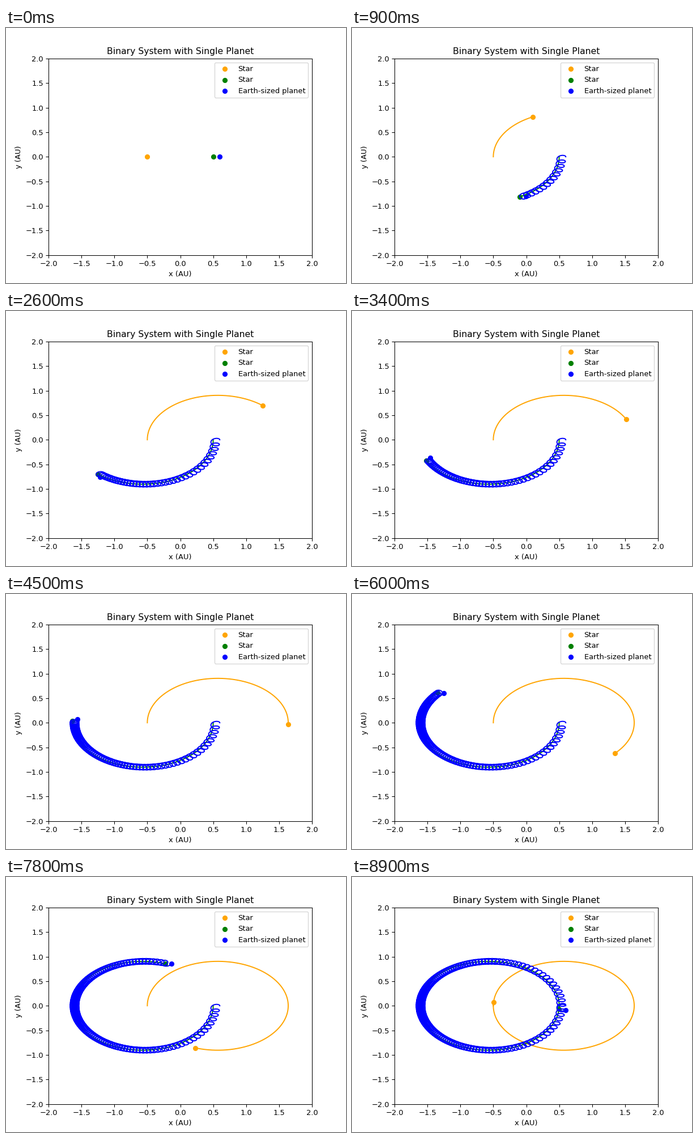
Animation of 600x450 px, one loop 9 s. Source, as a matplotlib script:

```python
import numpy as np
import matplotlib.pyplot as plt
from matplotlib.animation import FuncAnimation

FRAMES = 90
INTERVAL = 100            # ms
GM = 4 * np.pi ** 2       # one solar mass, in AU^3 / yr^2
SAMPLES = 50              # trail points per frame
SUBSTEPS = 20             # integration steps per trail point
DT = 0.025 / (SAMPLES * SUBSTEPS)   # years


def accel(star, planet):
    """Accelerations; the other star always sits at -star."""
    near, far = planet - star, planet + star
    return (-GM * star / (4 * abs(star) ** 3),
            -GM * (near / abs(near) ** 3 + far / abs(far) ** 3))


def rk4(s, p, vs, vp, h):
    k = h / 2
    as1, ap1 = accel(s, p)
    vs2, vp2 = vs + k * as1, vp + k * ap1
    as2, ap2 = accel(s + k * vs, p + k * vp)
    vs3, vp3 = vs + k * as2, vp + k * ap2
    as3, ap3 = accel(s + k * vs2, p + k * vp2)
    vs4, vp4 = vs + h * as3, vp + h * ap3
    as4, ap4 = accel(s + h * vs3, p + h * vp3)
    w = h / 6
    return (s + w * (vs + 2 * vs2 + 2 * vs3 + vs4),
            p + w * (vp + 2 * vp2 + 2 * vp3 + vp4),
            vs + w * (as1 + 2 * as2 + 2 * as3 + as4),
            vp + w * (ap1 + 2 * ap2 + 2 * ap3 + ap4))


def simulate():
    """Positions as complex numbers x + iy for both stars and the planet."""
    state = (0.5 + 0j, 0.6 + 0j, -5.5j, 8.6j)
    track = [state[:2]]
    for _ in range((FRAMES - 1) * SAMPLES):
        for _ in range(SUBSTEPS):
            state = rk4(*state, DT)
        track.append(state[:2])
    star, planet = np.array(track).T
    return -star, star, planet


paths = simulate()
colors = ["orange", "green", "blue"]
labels = ["Star", "Star", "Earth-sized planet"]

fig, ax = plt.subplots(figsize=(6.4, 4.8), dpi=93.75)   # 600 x 450 px
ax.set(xlim=(-2, 2), ylim=(-2, 2), xlabel="x (AU)", ylabel="y (AU)",
       title="Binary System with Single Planet")
trails = [ax.plot([], [], color=c)[0] for c in colors]
dots = [ax.scatter(z[0].real, z[0].imag, color=c, label=name)
        for z, c, name in zip(paths, colors, labels)]
ax.legend(loc="upper right")


def update(frame):
    end = frame * SAMPLES
    for z, trail, dot in zip(paths, trails, dots):
        trail.set_data(z.real[:end + 1], z.imag[:end + 1])
        dot.set_offsets([[z[end].real, z[end].imag]])
    return trails + dots


anim = FuncAnimation(fig, update, frames=FRAMES, interval=INTERVAL,
                     repeat=True, repeat_delay=0)
plt.show()
```
